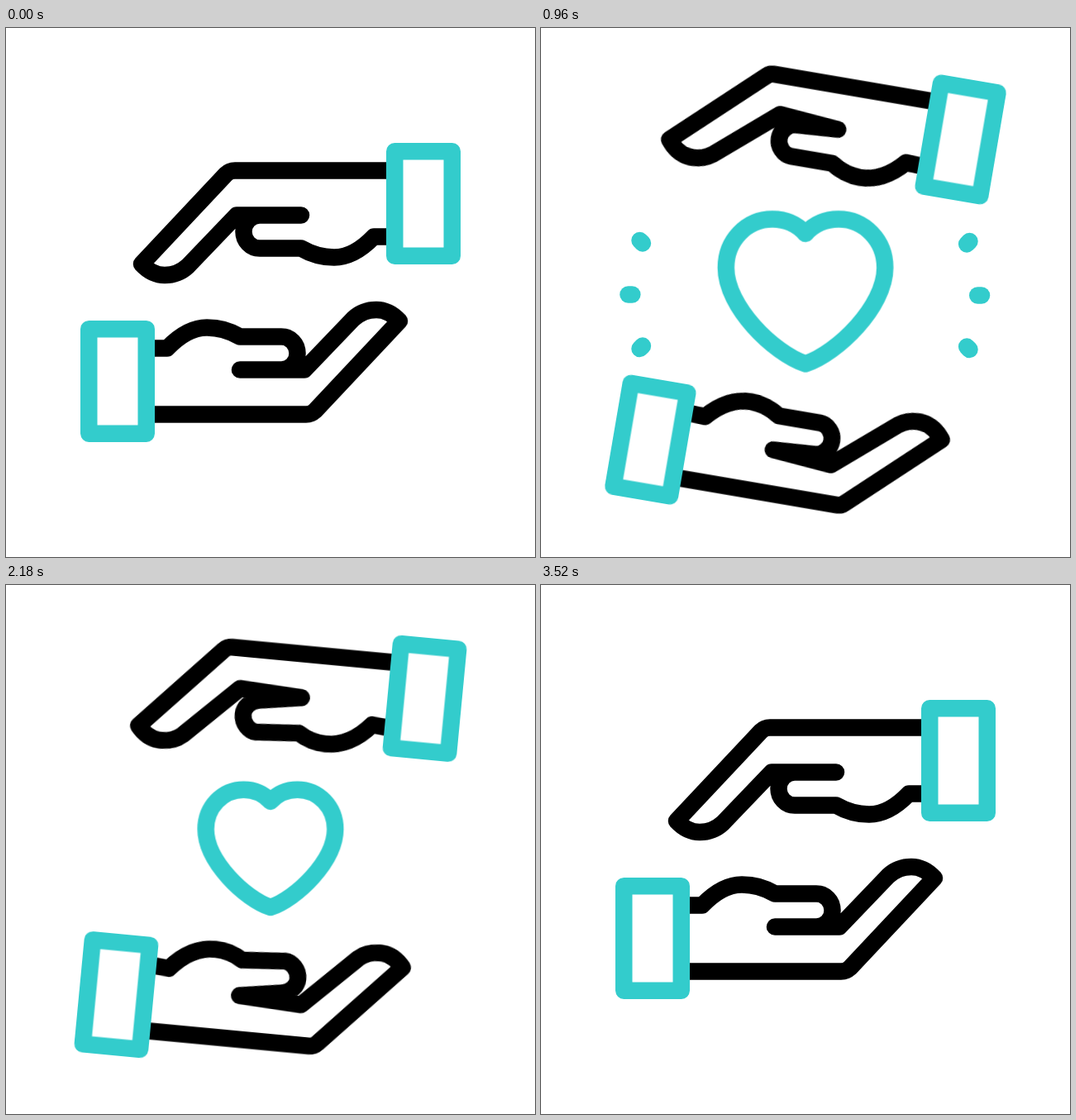
Recreate the animation shown at these times as an HTML page without scripts. Size 640 px wide and 640 px high, loop 3600 ms.

```html
<!DOCTYPE html>
<html lang="en">
<head>
<meta charset="utf-8">
<title>Caring hands</title>
<style>
  html, body { margin: 0; width: 100%; height: 100%; overflow: hidden; background: #fff; }
  svg { display: block; width: 640px; height: 640px; }

  path, rect, line {
    fill: none;
    stroke: #3cc;
    stroke-width: 20.5px;
    stroke-linecap: round;
    stroke-linejoin: round;
  }
  .hand, .palm, .heart, .spark {
    animation: 3.6s cubic-bezier(.333, 0, .667, 1) infinite;
  }

  /* --lower is 1 for the bottom hand, which travels a little less */
  .hand { --lower: 0; transform-origin: 505px 212.5px; animation-name: move; }
  .bottom { --lower: 1; }
  .cuff { fill: #fff; }
  .palm { fill: #fff; stroke: #000; animation-name: flex; }

  .heart { vector-effect: non-scaling-stroke; animation-name: beat; }
  .heart-layer { animation: show-heart 3.6s step-end infinite; }

  .spark { stroke-dasharray: 1 3; animation-name: shoot; }
  .sparks { animation: show-sparks 3.6s step-end infinite; }

  /* rest, closed, open, half open */
  @keyframes move {
    0%, 97.778%, 100% { transform: translate(0px, 0px) rotate(0deg); }
    11.111%, 88.889% { transform: translate(0px, calc(66.3px - var(--lower) * 8.4px)) rotate(0deg); }
    22.222%, 44.444%, 66.667% { transform: translate(4.4px, calc(-81.5px + var(--lower) * 7px)) rotate(16.7deg); }
    33.333%, 55.556%, 77.778% { transform: translate(-.6px, calc(-70.3px + var(--lower) * 7px)) rotate(-3deg); }
  }

  /* relaxed, stretched, bent */
  @keyframes flex {
    0%, 11.111%, 88.889%, 100% {
      d: path("M468 172.5 L277 172.5 Q270.5 172.5 266 177 L164 285.5 C172 294 182 299 192 299 C203 299 212 295.5 220 288 L279 226.5 L357 226.5 L307 226.5 C296 226.5 287.5 235.5 287.5 246.5 C287.5 257.5 296 266.5 307 266.5 L357 266.5 C370 274 383 277.5 397 277.5 C416 277.5 432 266 445 252.5 L468 252.5");
    }
    22.222%, 44.444%, 66.667% {
      d: path("M468 172.5 L275 172.5 Q270 171.5 266.5 174 L148.3 261.2 C155.4 271.2 164.2 278.1 174 280 C184.8 282.3 194.3 280.7 203.6 275 L290.3 215.2 L356.6 225 L306 220 C296 219 288.9 231 288.9 241 C288.9 249 296 257.2 305.1 258.2 L356.2 264.5 C369.5 273.5 383 277.5 397 277.5 C416 277.5 432 266 444.5 252.5 L468 252.5");
    }
    33.333%, 55.556%, 77.778% {
      d: path("M468 172.5 L262.7 172.8 Q255 173 250.2 179.6 L174.7 290.6 C182 298.5 191 302.5 200 302.5 C212 302.5 221 299 228 291 L274.8 226.3 L356.7 226 L305 244 C294.5 247.7 287.6 253 287.6 260.5 C287.6 273 298 285 309 282.6 L358.4 271.7 C367 276.5 376 279.3 385.5 279.3 C408 279.3 429 268 444.9 248.3 L468 252");
    }
  }

  @keyframes beat {
    0%, 11.111%, 33.333%, 55.556%, 77.778%, 100% { transform: translate(320px, 318.6px) scale(.377); }
    22.222%, 44.444%, 66.667% { transform: translate(320px, 318.6px) scale(1.113); }
  }
  @keyframes show-heart {
    0%, 88.889%, 100% { opacity: 0; }
    11.111% { opacity: 1; }
  }

  @keyframes shoot {
    0%, 16.667%, 38.889%, 61.111%, 100% { stroke-dashoffset: 1; }
    22.222%, 44.444%, 66.667% { stroke-dashoffset: 0; }
    27.778%, 50%, 72.222% { stroke-dashoffset: -1; }
  }
  @keyframes show-sparks {
    0%, 27.778%, 50%, 72.222%, 100% { opacity: 0; }
    16.667%, 38.889%, 61.111% { opacity: 1; }
  }
</style>
</head>
<body>
<svg viewBox="0 0 640 640">
  <g class="sparks">
    <line class="spark" pathLength="1" x1="154" y1="291" x2="119.5" y2="257"/>
    <line class="spark" pathLength="1" x1="154" y1="322.5" x2="105.5" y2="322.5"/>
    <line class="spark" pathLength="1" x1="154" y1="354" x2="119.5" y2="388"/>
    <line class="spark" pathLength="1" x1="485" y1="292" x2="518.5" y2="258"/>
    <line class="spark" pathLength="1" x1="485" y1="323.5" x2="533" y2="323.5"/>
    <line class="spark" pathLength="1" x1="485" y1="355" x2="518.5" y2="389"/>
  </g>

  <g class="heart-layer">
    <path class="heart" d="M0-82C-12-95.5-29-102.6-47-102.6C-84-102.6-113-72-113-33.6C-113 22-45 88 0 103C45 88 113 22 113-33.6C113-72 84-102.6 47-102.6C29-102.6 12-95.5 0-82Z"/>
  </g>

  <g class="hand">
    <path class="palm"/>
    <rect class="cuff" x="470.25" y="149.25" width="69.5" height="126.5"/>
  </g>
  <g transform="rotate(180 320 320)">
    <g class="hand bottom">
      <path class="palm"/>
      <rect class="cuff" x="470.25" y="149.25" width="69.5" height="126.5"/>
    </g>
  </g>
</svg>
</body>
</html>
```
